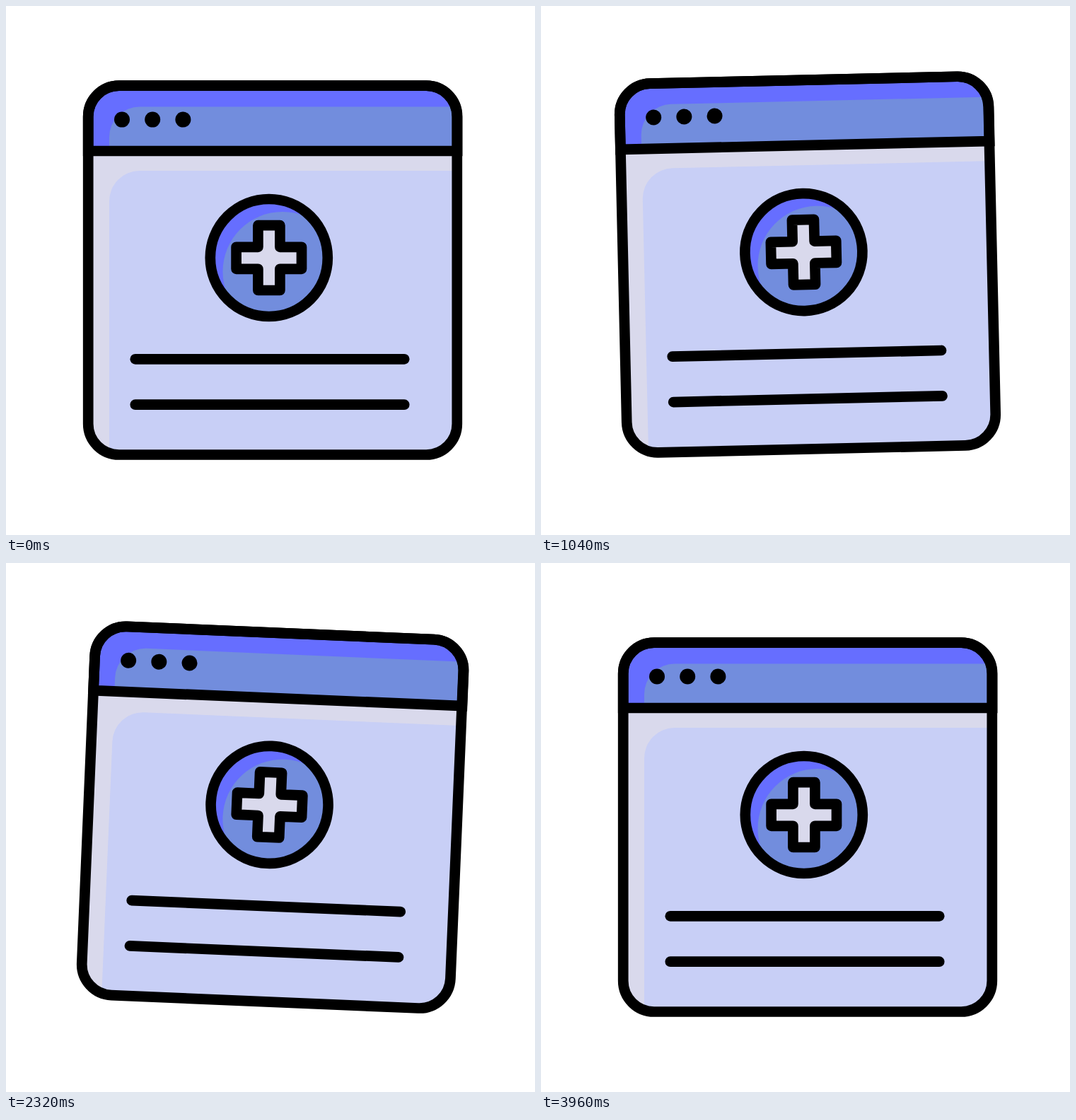
An HTML page for the animation above (4 s loop, 748 by 748 pixels).

```html
<!DOCTYPE html>
<html lang="en">
<head>
<meta charset="utf-8">
<title>Medical web page</title>
<style>
  html, body { margin: 0; width: 100%; height: 100%; overflow: hidden; background: #fff; }
  svg { display: block; width: 100%; height: 100%; }
  .outline { fill: none; stroke: #000; stroke-width: 14.7; }
</style>
</head>
<body>
<svg viewBox="0 0 748 748">
  <defs>
    <clipPath id="frame"><rect x="116" y="112.5" width="522" height="522" rx="44"/></clipPath>
    <clipPath id="disc"><circle cx="371.8" cy="356" r="83"/></clipPath>
  </defs>
  <g id="page">
    <g clip-path="url(#frame)">
      <rect x="109" y="105" width="537" height="537" fill="#d9d9ec"/>
      <path d="M146 642V276a43 43 0 0 1 43-43H646V642Z" fill="#c8cff6"/>
      <rect x="109" y="105" width="537" height="100" fill="#666eff"/>
      <path d="M146 205V185.5a43 43 0 0 1 43-43H646V205Z" fill="#728ddd"/>
    </g>
    <rect class="outline" x="116.2" y="112.7" width="521.6" height="521.8" rx="43.7"/>
    <path class="outline" d="M116.2 205V156.4a43.7 43.7 0 0 1 43.7-43.7H594.4a43.7 43.7 0 0 1 43.7 43.7V205Z"/>
    <circle cx="164" cy="160.6" r="11"/>
    <circle cx="207.2" cy="160.6" r="11"/>
    <circle cx="250.4" cy="160.6" r="11"/>
    <g id="badge">
      <g clip-path="url(#disc)">
        <circle cx="371.8" cy="356" r="83" fill="#666eff"/>
        <circle cx="391" cy="375.5" r="84.5" fill="#728ddd"/>
      </g>
      <circle class="outline" cx="371.8" cy="356" r="83"/>
      <path class="outline" style="fill:#d9d9ec" stroke-linejoin="round"
        d="M356.4 310.2H387.4V340.8H418V371.8H387.4V402H356.4V371.8H325.6V340.8H356.4Z"/>
    </g>
    <path class="outline" id="line1" stroke-linecap="round"/>
    <path class="outline" id="line2" stroke-linecap="round"/>
  </g>
</svg>
<script>
const LOOP = 4000, STEP = 40, TURN = 2 * Math.PI;
const byId = id => document.getElementById(id);
const clamp = p => Math.min(1, Math.max(0, p));
const ease = p => (1 - Math.cos(Math.PI * p)) / 2;
const ramp = (t, from, to) => ease(clamp((t - from) / (to - from)));

// Rises to 1 and falls back to 0 between two times.
const bump = (t, from, to) => ease(2 * clamp((t - from) / (to - from)));

// A shake that swells quickly, fades slowly and drifts a little in tempo.
function tilt(t) {
  const size = 6.1 * ramp(t, 850, 1450) * Math.max(0, (3700 - t) / 2235);
  const drift = 5.4 + 46.6 * Math.cos(TURN * (t - 2450) / 2400);
  return -size * Math.cos(TURN * (t - drift - 1025) / 472);
}

// Each line retracts, then is drawn again from the left.
function drawLine(id, y, t, redrawAt) {
  const length = t < redrawAt ? 1 - ramp(t, 2480, 3080) : ramp(t, redrawAt, redrawAt + 540);
  byId(id).setAttribute("d", length > 0 ? `M182.8 ${y}h${380.4 * length}` : "");
}

function draw(now) {
  const t = Math.floor(now % LOOP / STEP) * STEP;
  const lift = -15 * bump(t, 0, LOOP);
  const scale = 1 - 0.115 * bump(t, 0, 840);
  byId("page").setAttribute("transform", `translate(0 ${lift}) rotate(${tilt(t)} 374 374)`);
  byId("badge").setAttribute("transform",
    `translate(371.8 356) scale(${scale}) translate(-371.8 -356)`);
  drawLine("line1", 499.3, t, 3120);
  drawLine("line2", 563.7, t, 3240);
}

const start = performance.now();
function tick() {
  draw(performance.now() - start);
  requestAnimationFrame(tick);
}
tick();
</script>
</body>
</html>
```
